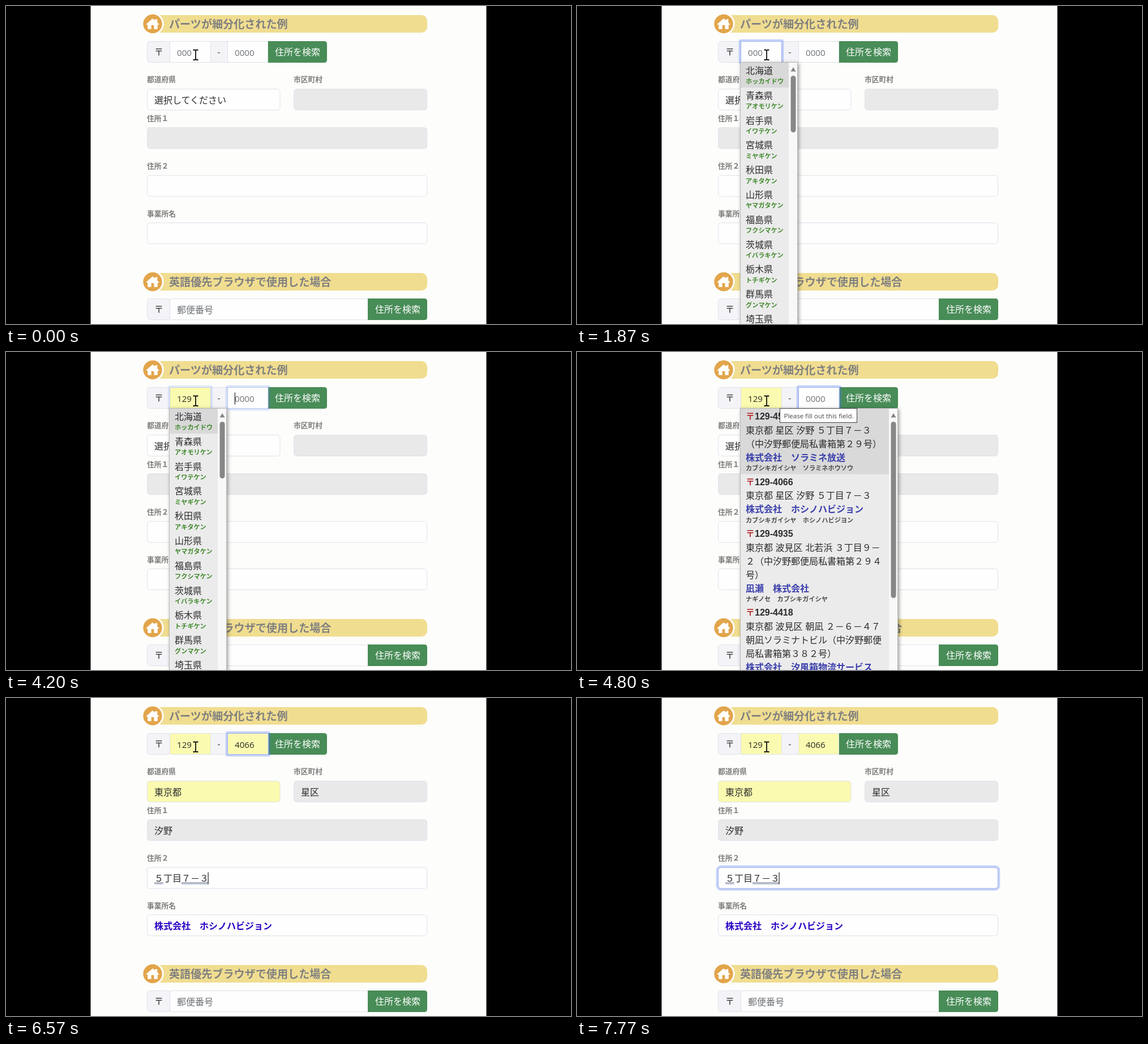
These frames come from a looping animation (998x561 px, 7.81 s). An HTML page:

```html
<!DOCTYPE html>
<html lang="ja">
<head>
<meta charset="utf-8">
<title>住所検索フォーム</title>
<style>
  html, body { margin: 0; width: 100%; height: 100%; overflow: hidden; background: #000; }
  svg { display: block; width: 998px; height: 561px; }
  text { font: 16px "Noto Sans CJK JP", "Noto Sans CJK", sans-serif; fill: #2b2b2b;
         white-space: pre; text-spacing-trim: space-all; }
  .num { font: 15.1px "Open Sans", "Noto Sans", sans-serif; }
  .hint { fill: #6c7175; }
  .head { font-size: 19.1px; font-weight: bold; fill: #808080; }
  .label { font-size: 12.75px; font-weight: bold; fill: #7c7c7c; }
  .btn { fill: #fff; }
  .kana { font-size: 11.2px; font-weight: bold; fill: #40892c; }
  .code { font: bold 16px "Liberation Sans", Arial, sans-serif; }
  .mark { font-weight: bold; fill: #b02a2a; }
  .addr { word-spacing: 1px; }
  .firm { font-weight: bold; fill: #3b3fab; }
  .ruby { font-size: 11.2px; font-weight: bold; fill: #4c4c4c; }
  .filled { font-weight: bold; fill: #2a00c4; }
  .tip { font: 11.5px "Open Sans", "Noto Sans", sans-serif; fill: #444; }
  .menu { filter: drop-shadow(2px 2px 3px rgba(0, 0, 0, .38)); }
</style>
</head>
<body>
<svg id="stage" viewBox="0 0 998 561"></svg>
<script>
const LOOP = 7810;
const YELLOW = '#fafab0', GREY = '#e9e9ea', LINE = '#e0e2ea', WHITE = '#fefefe';

// When things happen, in ms
const AT = {
  focus1: 200, menu1: 300, focus2: 4120, menu2: 4450,
  tipOn: 4650, tipOff: 5450, done: 6530, focus3: 6560
};
const KEYS1 = [3450, 3780, 4110];
const KEYS2 = [5450, 5800, 6200, 6480];
const ZIP = ['129', '4066'];
const FIRM = '株式会社　ホシノハビジョン';
const STREET = '５丁目７－３';

// y is the visual middle of the line
const SIZE = { head: 19.1, label: 12.75, kana: 11.2, ruby: 11.2, tip: 11.5, num: 15.1 };
const text = (x, y, s, cls = '', id = '') => {
  const size = SIZE[cls.split(' ')[0]] || 16;
  return `<text x="${x}" y="${(y + size * 0.37).toFixed(2)}" class="${cls}" ${id && `id="${id}"`}>${s}</text>`;
};
const rect = (x, y, w, h, fill, more = '') =>
  `<rect x="${x}" y="${y}" width="${w}" height="${h}" fill="${fill}" ${more}/>`;
const group = (id, body) => `<g id="${id}" visibility="hidden">${body}</g>`;
const box = (x, y, w, fill, r = 5, id = '') =>
  rect(x + .5, y + .5, w - 1, 37, fill, `rx="${r}" stroke="${LINE}" ${id && `id="${id}"`}`);
const glow = (id, x, y, w, r) => `<g id="${id}" opacity="0">` +
  rect(x - 1.5, y - 1.5, w + 3, 41, 'none', `rx="${r + 2}" stroke="#5078f0" stroke-opacity=".32" stroke-width="3.6"`) +
  rect(x + .5, y + .5, w - 1, 37, 'none', `rx="${r}" stroke="#9db2f3"`) + '</g>';
const caret = (id, y) => rect(0, y, 1.2, 21, '#222', `id="${id}" visibility="hidden"`);

const button = (x, y) =>
  `<path d="M${x} ${y}h100q5 0 5 5v28q0 5-5 5h-100z" fill="#488c57"/>` +
  text(x + 13, y + 19, '住所を検索', 'btn');

const heading = (y, s) =>
  rect(258, y - 15.5, 486, 31, '#f0dd90', 'rx="10"') +
  `<circle cx="259" cy="${y}" r="18.2" fill="#e2a54b" stroke="#fdfdfb" stroke-width="3"/>
  <g transform="translate(259 ${y})" fill="#fff" stroke="#fff" stroke-linejoin="round">
    <path d="M0-8.5L-10.5 .8h2.5v7.7h16V.8h2.5L7.5-2v-5.5h-2.5v3z" stroke-width="1.6"/>
    <path d="M-2.4 9.5v-6.3q0-1 1-1h2.8q1 0 1 1v6.3z" fill="#e2a54b" stroke="none"/>
  </g>` + text(288, y + .5, s, 'head');

const zipMark = y => box(249, y, 41, '#f4f4f8') + text(262, y + 19.5, '〒');

const page = () =>
  rect(149.5, 0, 699, 561, '#fdfdfb') +
  heading(31.5, 'パーツが細分化された例') +
  zipMark(62) +
  box(361, 62, 31, '#f4f4f8', 0) + text(373.5, 81, '-', 'num') +
  button(462, 62) +
  box(289, 62, 73, WHITE, 0, 'zipBox0') + box(391, 62, 72, WHITE, 0, 'zipBox1') +
  glow('glow0', 289, 62, 73, 0) + glow('glow1', 391, 62, 73, 0) +
  text(302, 82, '000', 'num hint', 'zip0') + text(404, 82, '0000', 'num hint', 'zip1') +
  text(249, 129.5, '都道府県', 'label') + text(508, 129.5, '市区町村', 'label') +
  box(249, 146, 235.5, WHITE, 5, 'prefBox') + box(508, 146, 236, GREY) +
  text(262, 166, '選択してください', '', 'pref') +
  text(249, 198, '住所１', 'label') + box(249, 214, 495, GREY) +
  text(249, 282, '住所２', 'label') + box(249, 298.5, 495, WHITE) + glow('glow2', 249, 298.5, 495, 5) +
  text(249, 366.5, '事業所名', 'label') + box(249, 382, 495, WHITE) +
  group('result',
    text(521, 166, '星区') + text(262, 234, '汐野') + text(262, 318.5, STREET) +
    [[262, 15.5], [310, 47]].map(([x, w]) =>
      rect(x, 325.5, w, 1, '#59627c') + rect(x, 327.5, w, 1, '#8e98b8')).join('') +
    text(262, 402, FIRM, 'filled')) +
  heading(486.5, '英語優先ブラウザで使用した場合') +
  zipMark(516) + box(289, 516, 351, WHITE, 0) + text(302, 536, '郵便番号', 'hint') +
  button(639, 516);

// Popup list with its scrollbar; the list runs off the bottom of the stage
const menu = (id, w, firstH, thumbH, items) => {
  const right = 288 + w, mid = right - 8;
  return group(id,
    rect(288.5, 99.5, w - 1, 480, '#ebebeb', 'class="menu" stroke="#b8b8b8"') +
    rect(289, 100, w - 17, firstH, '#d9d9d9') +
    rect(right - 16, 100, 15, 470, '#f8f8f8') +
    `<path d="M${mid} 108l4.6 7.5h-9.2z" fill="#858585"/>` +
    rect(mid - 4.5, 123, 9, thumbH, '#878787', 'rx="4.5"') + items);
};

const PREFS = ['北海道 ホッカイドウ', '青森県 アオモリケン', '岩手県 イワテケン', '宮城県 ミヤギケン',
  '秋田県 アキタケン', '山形県 ヤマガタケン', '福島県 フクシマケン', '茨城県 イバラキケン',
  '栃木県 トチギケン', '群馬県 グンマケン', '埼玉県 サイタマケン'];
const prefItems = PREFS.map((p, i) => {
  const [name, kana] = p.split(' '), y = 114 + i * 43.8;
  return text(298, y, name) + text(298, y + 19.3, kana, 'kana');
}).join('');

const OFFICES = [
  { y: 113.5, code: '129-4572', lines: ['東京都 星区 汐野 ５丁目７－３', '（中汐野郵便局私書箱第２９号）'],
    firm: '株式会社　ソラミネ放送', kana: 'カブシキガイシヤ　ソラミネホウソウ' },
  { y: 228.7, code: '129-4066', lines: ['東京都 星区 汐野 ５丁目７－３'],
    firm: FIRM, kana: 'カブシキガイシヤ　ホシノハビジヨン' },
  { y: 320.2, code: '129-4935', lines: ['東京都 波見区 北若浜 ３丁目９－', '２（中汐野郵便局私書箱第２９４', '号）'],
    firm: '凪瀬　株式会社', kana: 'ナギノセ　カブシキガイシヤ' },
  { y: 459.5, code: '129-4418', lines: ['東京都 波見区 朝凪 ２－６－４７', '朝凪ソラミナトビル（中汐野郵便', '局私書箱第３８２号）'],
    firm: '株式会社　汐風箱物流サービス', kana: '' }
];
const officeItems = OFFICES.map(o => {
  const firmY = o.y + 24.4 + o.lines.length * 24;
  return text(298, o.y, '〒', 'mark') + text(314, o.y, o.code, 'code') +
    o.lines.map((s, i) => text(298, o.y + 24.5 + i * 24, s, 'addr')).join('') +
    text(298, firmY, o.firm, 'firm') + text(298, firmY + 19.3, o.kana, 'ruby');
}).join('');

const tip = group('tip',
  rect(358.5, 99.5, 136, 25, '#fff', 'stroke="#444"') +
  text(365.5, 112.5, 'Please fill out this field.', 'tip'));

const pointer = `<path d="M330.5 77.5h3.2l1.3 1 1.3-1h3.2M335 78.5v15.5M330.5 95h3.2l1.3-1 1.3 1h3.2"
  fill="none" stroke="#111" stroke-width="1.8"/>`;

document.getElementById('stage').innerHTML = page() +
  caret('caret0', 71.5) + caret('caret1', 71.5) + caret('caret2', 307.5) +
  menu('menu1', 102, 44, 100, prefItems) + menu('menu2', 279, 115.5, 311, officeItems) +
  tip + pointer;

const $ = id => document.getElementById(id);
const show = (id, on) => $(id).setAttribute('visibility', on ? 'visible' : 'hidden');
const ramp = (t, from) => {
  const p = Math.min(1, Math.max(0, (t - from) / 150));
  return p * p * (3 - 2 * p);
};
const count = (t, keys) => keys.filter(k => t >= k).length;

function setZip(i, n) {
  const el = $('zip' + i);
  el.textContent = n ? ZIP[i].slice(0, n) : '0'.repeat(ZIP[i].length);
  el.setAttribute('class', n ? 'num' : 'num hint');
  $('zipBox' + i).setAttribute('fill', n ? YELLOW : WHITE);
}

// The blink restarts on focus and on every key
function setCaret(i, t, from, to, keys, x) {
  const last = Math.max(from, ...keys.filter(k => k <= t));
  show('caret' + i, t >= from && t < to && (t - last) % 1060 < 530);
  $('caret' + i).setAttribute('x', x);
}

function draw(t) {
  const n1 = count(t, KEYS1), n2 = count(t, KEYS2), done = t >= AT.done;
  setZip(0, n1);
  setZip(1, n2);
  $('glow0').setAttribute('opacity', ramp(t, AT.focus1) - ramp(t, AT.focus2));
  $('glow1').setAttribute('opacity', ramp(t, AT.focus2) - ramp(t, AT.focus3));
  $('glow2').setAttribute('opacity', ramp(t, AT.focus3));
  setCaret(0, t, AT.focus1, AT.focus2, KEYS1, 302 + n1 * 8.64);
  setCaret(1, t, AT.focus2, AT.focus3, KEYS2, 403.8 + n2 * 8.64);
  setCaret(2, t, AT.focus3, LOOP, [], 356.5);
  show('menu1', t >= AT.menu1 && t < AT.menu2);
  show('menu2', t >= AT.menu2 && !done);
  show('tip', t >= AT.tipOn && t < AT.tipOff);
  show('result', done);
  $('pref').textContent = done ? '東京都' : '選択してください';
  $('prefBox').setAttribute('fill', done ? YELLOW : WHITE);
}

const start = performance.now();
function tick() {
  draw((performance.now() - start) % LOOP);
  requestAnimationFrame(tick);
}
tick();
</script>
</body>
</html>
```
